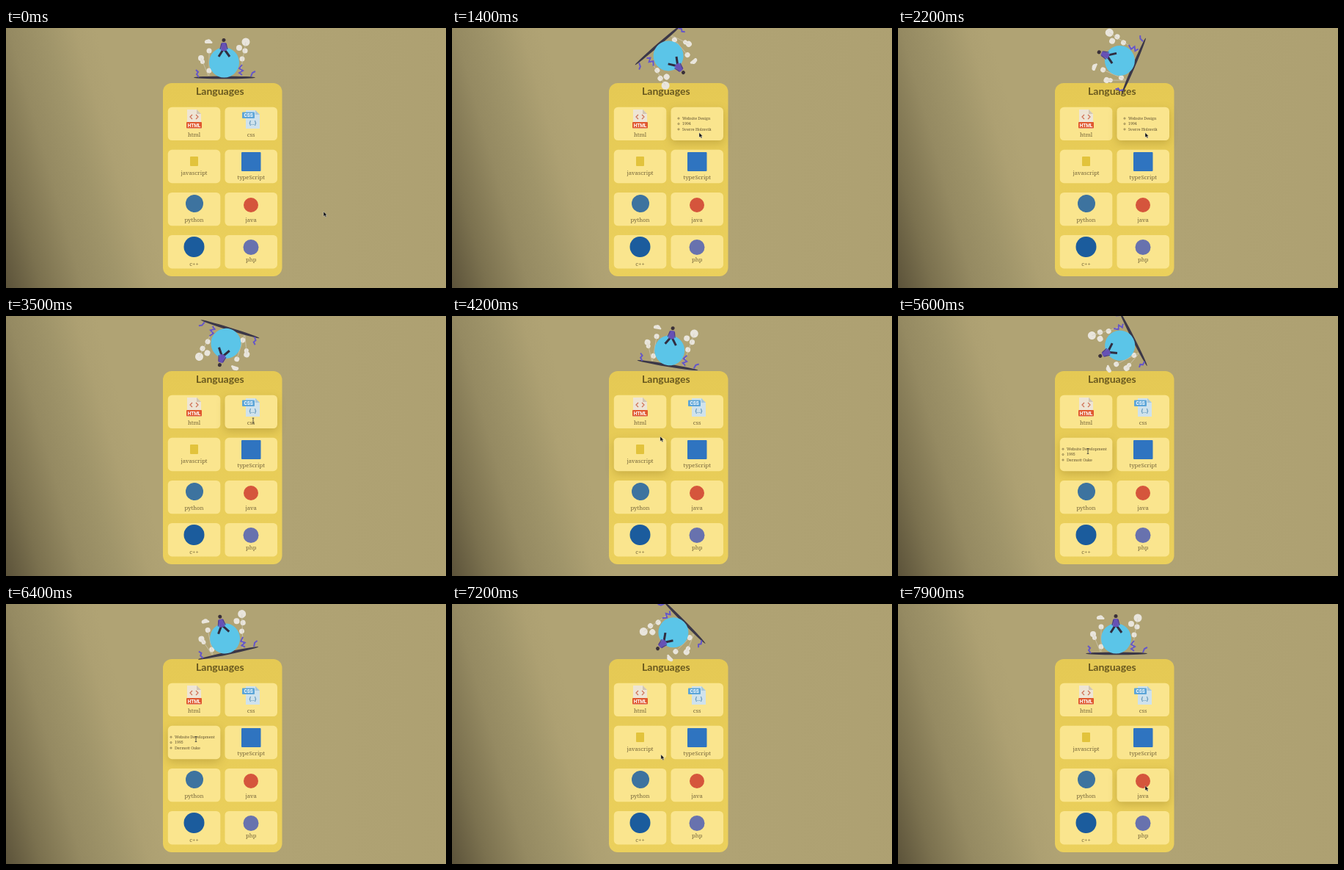
An HTML page that plays this animation: 600x354 px, repeating every 8 s.

```html
<!DOCTYPE html>
<html lang="en">
<head>
<meta charset="utf-8">
<title>Languages</title>
<style>
  html, body { margin: 0; width: 100%; height: 100%; overflow: hidden; }
  body {
    background:
      linear-gradient(90deg, transparent 60%, rgba(160,146,100,.15)),
      linear-gradient(74deg, #5c533a 0%, #7b714f 7%, #958a62 15%, #a0956a 22%, #ada072 28%, #b0a374 32%);
  }
  svg { display: block; width: 600px; height: 354px; }
  text { text-anchor: middle; }
  .title { font: 700 14px Lato, sans-serif; fill: #68581f; }
  .label { font: 7.7px "Noto Serif", serif; fill: #75653a; }
  .fact { font: 5.27px "Noto Serif", serif; fill: #5f5130; text-anchor: start; }
  .tag { font: 700 6.5px Roboto, sans-serif; fill: #fff; }
  .code { font: 700 8px Roboto, sans-serif; }
  .hover { filter: drop-shadow(0 4px 6px rgba(90,70,0,.22)); }
</style>
</head>
<body>
<svg viewBox="0 0 600 354">
  <defs>
    <linearGradient id="gold" x2="0" y2="1">
      <stop stop-color="#e5c954"/><stop offset="1" stop-color="#ebd05c"/>
    </linearGradient>
  </defs>
  <rect x="214" y="75" width="162.5" height="263" rx="12" fill="url(#gold)"/>
  <text class="title" x="291.8" y="91">Languages</text>
  <g id="cards"></g>

  <g id="art">
    <g fill="#e9e5dc">
      <path d="M271 20a3 3 0 0 1 3-4a4 4 0 0 1 6 2a2 2 0 0 1 1 3h-9z"/>
      <circle cx="327" cy="19" r="5.5"/><circle cx="318" cy="27" r="4"/>
      <circle cx="326" cy="31" r="3.6"/><circle cx="322" cy="42" r="3.5"/>
      <circle cx="266" cy="41" r="4"/><circle cx="277" cy="31" r="3.5"/>
      <circle cx="268" cy="46" r="3"/><circle cx="277" cy="58" r="3.5"/>
    </g>
    <path d="M327 19L319 64M266 41L276 65M277 31V65" stroke="#d6d0c1" stroke-width=".6" fill="none"/>
    <ellipse cx="298" cy="67.4" rx="42" ry="1.9" fill="#3b3747"/>
    <path d="M259 57l3 3-2 3 3 4M322 50l-4 5 5 3-5 3 4 3M334 66l2-5 4-2" stroke="#6556c9" stroke-width="2" fill="none"/>
    <circle cx="297.5" cy="47" r="20.5" fill="#5bc5e8"/>
    <path d="M297 28L290 39M297 28L305 39" stroke="#302d40" stroke-width="3" fill="none"/>
    <path d="M294 20h6l1 11h-8z" fill="#6651b5"/>
    <path d="M294 21l-2 8M300 21l2 8" stroke="#4c3d8d" stroke-width="1.3"/>
    <circle cx="297" cy="16.5" r="2.5" fill="#3a3038"/>
  </g>

  <g id="pointer">
    <path id="arrow" d="M0 0v6.5l1.6-1.3 1.2 2.4 1.2-.6-1.2-2.3h2z" fill="#111" stroke="#eee" stroke-width=".4"/>
    <path id="beam" d="M-1.3-3.5h2.6M0-3.5v7M-1.3 3.5h2.6" stroke="#333" stroke-width=".8" fill="none"/>
  </g>
</svg>
<script>
const $ = id => document.getElementById(id);
const square = (x, y, w, h, fill) => `<rect x="${x}" y="${y}" width="${w}" height="${h}" rx="1" fill="${fill}"/>`;
const disc = (x, y, r, fill) => `<circle cx="${x}" cy="${y}" r="${r}" fill="${fill}"/>`;

const htmlFile = `<path d="M247 111h13l6 6v20h-19z" fill="#eee5d5"/><path d="M260 111v6h6z" fill="#d2c6b3"/>
  <path d="M254 118l-3 3 3 3M259 118l3 3-3 3" fill="none" stroke="#cf7054" stroke-width="1.2"/>
  ${square(246, 128, 21, 8.5, "#e0582f")}<text class="tag" x="256.5" y="134.7">HTML</text>`;
const cssFile = `<path d="M327 112h13l6 6v19h-19z" fill="#cfe2ec"/><path d="M340 112v6h6z" fill="#a9c8da"/>
  <text class="code" x="336.5" y="131.5" fill="#538cb4">{..}</text>
  ${square(322, 114.5, 17, 8.5, "#5ca5d8")}<text class="tag" x="330.5" y="121.2">CSS</text>`;

// label, label baseline, icon, facts shown on the back
const cards = [
  ["html", 147.8, htmlFile],
  ["css", 147.8, cssFile, ["Website Design", "1994", "Sverre Holmvik"]],
  ["javascript", 200, square(251, 175, 11, 13, "#e2c33c"), ["Website Development", "1995", "Dermott Oake"]],
  ["typeScript", 206, square(321, 169, 26.5, 26, "#2f74c0")],
  ["python", 264, disc(257, 239, 12, "#3d739f")],
  ["java", 264, disc(334, 241, 10, "#d5553c")],
  ["c++", 324, disc(256.5, 298, 14, "#1b5c9d")],
  ["php", 318, disc(334, 298.5, 10.5, "#6872ae")],
];

$("cards").innerHTML = cards.map(([name, base, icon, facts], i) => {
  const x = i % 2 ? 298.5 : 220.8, y = 107.7 + 58.1 * (i >> 1);
  const inset = name === "css" ? 15.5 : 9.2;
  const back = (facts || []).map((fact, k) => {
    const row = y + 17.2 + 7.4 * k;
    return `<circle cx="${x + inset - 5}" cy="${row - 1.8}" r="1.1" fill="none" stroke="#5f5130" stroke-width=".6"/>
      <text class="fact" x="${x + inset}" y="${row}">${fact}</text>`;
  }).join("");
  return `<g><rect x="${x}" y="${y}" width="71.5" height="45.4" rx="5.5" fill="#fae58e"/>
    <g class="front">${icon}<text class="label" x="${x + 35.7}" y="${base}">${name}</text></g>
    <g class="back">${back}</g></g>`;
}).join("");

const spin = [[0, 0], [900, 60], [1400, 139], [2200, 293], [3500, 557], [4800, 862], [6400, 1068], [7900, 1440]];
const path = [[100, 433, 250], [950, 337, 142.5], [3800, 337, 142.5], [4450, 258, 174.5],
  [5000, 258, 174.5], [5300, 259, 184], [6950, 259, 184], [7600, 337, 247.5]];
const beams = [[2900, 3800], [5300, 6950]];
const hovers = { 1: [850, 3950], 2: [4200, 7100], 5: [7350, 8000] };
const flips = { 1: [1100, 2900], 2: [4600, 6800] };

const within = (span, t) => !!span && t >= span[0] && t < span[1];

// Smooth curve through the keys, at rest at both ends
function curve(keys, t) {
  const last = keys.length - 1;
  if (t >= keys[last][0]) return keys[last][1];
  const i = keys.findIndex(k => k[0] > t) - 1;
  const slope = n => n <= 0 || n >= last ? 0
    : (keys[n + 1][1] - keys[n - 1][1]) / (keys[n + 1][0] - keys[n - 1][0]);
  const [t0, a] = keys[i], [t1, b] = keys[i + 1], d = t1 - t0, u = (t - t0) / d;
  return a + (b - a) * u * u * (3 - 2 * u)
    + d * u * (1 - u) * (slope(i) * (1 - u) - slope(i + 1) * u);
}

function pointerAt(t) {
  const n = path.findIndex(k => k[0] > t);
  if (n === 0) return path[0].slice(1);
  if (n < 0) return path[path.length - 1].slice(1);
  const a = path[n - 1], b = path[n], u = (t - a[0]) / (b[0] - a[0]), e = u * u * (3 - 2 * u);
  return [a[1] + (b[1] - a[1]) * e, a[2] + (b[2] - a[2]) * e];
}

function draw(now) {
  const t = now % 8000;
  $("art").setAttribute("transform", `rotate(${curve(spin, t)} 298 42)`);
  $("pointer").setAttribute("transform", `translate(${pointerAt(t)})`);
  const beam = beams.some(span => within(span, t));
  $("beam").style.display = beam ? "" : "none";
  $("arrow").style.display = beam ? "none" : "";
  [...$("cards").children].forEach((card, i) => {
    const flipped = within(flips[i], t);
    card.classList.toggle("hover", within(hovers[i], t));
    card.querySelector(".front").style.display = flipped ? "none" : "";
    card.querySelector(".back").style.display = flipped ? "" : "none";
  });
  requestAnimationFrame(draw);
}
draw(performance.now());
</script>
</body>
</html>
```
